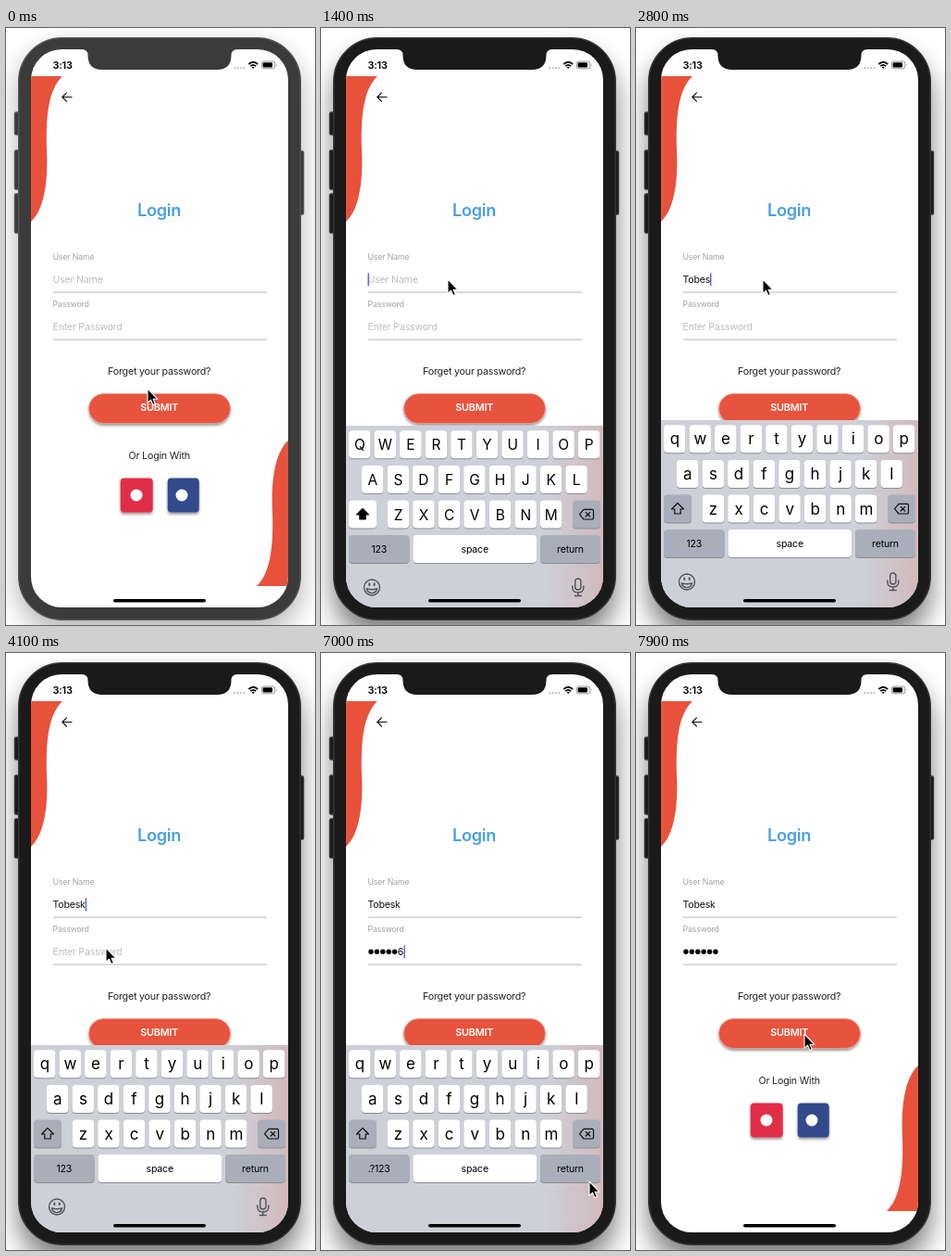
Write an HTML page that moves like this. It is 334 px wide and 644 px high and loops after 8000 ms.

```html
<!DOCTYPE html>
<html lang="en">
<head>
<meta charset="utf-8">
<title>Login screen</title>
<style>
  html, body { margin: 0; width: 100%; height: 100%; overflow: hidden; background: #fff; }
  svg { display: block; width: 334px; height: 644px; }
  text { font-family: Inter, Roboto, sans-serif; letter-spacing: -.02em; }
  .mid { text-anchor: middle; }
  .label { font-size: 8.8px; fill: #a3a3a3; }
  .hint { font-size: 10.6px; fill: #bdbdbd; }
  .value { font-size: 10.6px; fill: #111; }
  .note { font-size: 10.7px; fill: #222; }
  .line { fill: none; stroke: #111; stroke-width: 1.2; stroke-linecap: round; stroke-linejoin: round; }
</style>
</head>
<body>
<svg id="stage" viewBox="0 0 334 644">
  <defs>
    <filter id="blur" x="-30%" y="-20%" width="160%" height="140%"><feGaussianBlur stdDeviation="14"/></filter>
    <filter id="soft" x="-20%" y="-30%" width="140%" height="180%">
      <feDropShadow dx="0" dy="2" stdDeviation="1.7" flood-opacity=".42"/>
    </filter>
    <clipPath id="screen"><rect x="27" y="23" width="278" height="602" rx="33"/></clipPath>
    <linearGradient id="tint">
      <stop offset=".78" stop-color="#d99a98" stop-opacity="0"/>
      <stop offset="1" stop-color="#d99a98" stop-opacity=".42"/>
    </linearGradient>
    <path id="wave" d="M27 52H61C46 66 43 95 44 130C46 170 40 197 27 209Z" fill="#e8523c"/>
  </defs>

  <rect width="334" height="644" fill="#fff"/>
  <rect id="shadow" x="13" y="10" width="306" height="629" rx="48" filter="url(#blur)"/>
  <g id="body" stroke-width="1.5">
    <rect x="9.5" y="91" width="6" height="24" rx="1.5"/>
    <rect x="9.5" y="132" width="6" height="42" rx="1.5"/>
    <rect x="9.5" y="179" width="6" height="42" rx="1.5"/>
    <rect x="316" y="133" width="5.5" height="68" rx="1.5"/>
    <rect x="13.75" y="10.75" width="304.5" height="627.5" rx="47"/>
  </g>

  <g clip-path="url(#screen)">
    <rect x="27" y="23" width="278" height="602" fill="#fff"/>
    <use href="#wave"/>
    <use href="#wave" transform="rotate(180 166 327)"/>
    <path class="line" d="M71 74.5H61M65.5 69.8L60.8 74.5L65.5 79.2" stroke-width="1.6"/>

    <text class="mid" x="165.5" y="203" font-size="18.2" font-weight="600" fill="#4a9fe2">Login</text>
    <text class="label" x="50.5" y="250">User Name</text>
    <text class="label" x="50.5" y="301">Password</text>
    <path d="M51 285.2H282M51 336.2H282" stroke="#c6c6c6" stroke-width="1.2"/>
    <text id="userHint" class="hint" x="50.5" y="275.3">User Name</text>
    <text id="passHint" class="hint" x="50.5" y="326.3">Enter Password</text>
    <text id="user" class="value" x="50.5" y="275.3"></text>
    <g id="dots"></g>
    <text id="digit" class="value" y="326.3"></text>
    <rect id="caret" width="1.4" height="14" fill="#3f6fd8"/>

    <text class="note mid" x="165.7" y="374.2">Forget your password?</text>
    <rect x="89.5" y="394.5" width="153" height="32" rx="16" fill="#e8523c" stroke="#dfa79c" stroke-width=".7" filter="url(#soft)"/>
    <text class="mid" x="165.7" y="412.7" font-size="10.8" font-weight="600" fill="#fff">SUBMIT</text>
    <text class="note mid" x="165.7" y="464.5">Or Login With</text>
    <g filter="url(#soft)">
      <rect x="123.7" y="485.5" width="35" height="37" rx="4" fill="#e02d48"/>
      <rect x="174.7" y="485.5" width="34" height="37" rx="4" fill="#314a8c"/>
    </g>
    <circle cx="141" cy="504" r="6.5" fill="#fff"/>
    <circle cx="190" cy="504" r="6.5" fill="#fff"/>

    <g id="keyboard">
      <rect x="27" y="423" width="278" height="210" fill="#cdd0d7"/>
      <rect x="27" y="423" width="278" height="210" fill="url(#tint)"/>
      <g id="keys"></g>
      <path id="shift" d="M45 512.5L51.5 519H48.2V524H41.8V519H38.5Z" stroke="#111" stroke-width="1.2" stroke-linejoin="round"/>
      <path class="line" d="M279.5 518.7L284 513.4H293Q294.5 513.4 294.5 515V522.4Q294.5 524 293 524H284ZM286.2 516.4L290.8 521M290.8 516.4L286.2 521"/>
      <g id="extras" fill="none" stroke="#50555c" stroke-width="1.4" stroke-linecap="round">
        <circle cx="55" cy="597.5" r="8.5"/>
        <path d="M49.5 599Q55 600.5 60.5 599Q59.5 603.6 55 603.6Q50.5 603.6 49.5 599Z"/>
        <path d="M52.3 593.5V595M57.7 593.5V595" stroke-width="2"/>
        <rect x="274.7" y="588" width="6.2" height="12" rx="3.1"/>
        <path d="M271.8 596V598Q272 603 277.8 603Q283.6 603 283.8 598V596M277.8 603V606.5M274.3 606.5H281.3"/>
      </g>
    </g>
    <rect x="116" y="616" width="100" height="3.5" rx="1.75" fill="#000"/>

    <path id="notch" d="M82 22V23Q88.5 23 88.5 29.5Q88.5 45 104 45H228Q243.5 45 243.5 29.5Q243.5 23 250 23V22Z"/>
    <text x="50.5" y="43.8" font-size="11" font-weight="600">3:13</text>
    <path d="M247.2 43H260" stroke="#b5b5b5" stroke-width="2" stroke-linecap="round" stroke-dasharray="0 3.4"/>
    <g fill="none" stroke="#000" stroke-width="1.7">
      <path d="M262.3 39Q267.2 34.5 272.1 39M264.2 41.2Q267.2 38.5 270.2 41.2"/>
      <path d="M267.2 44L265.6 42.4Q267.2 41 268.8 42.4Z" fill="#000" stroke="none"/>
    </g>
    <rect x="276.3" y="36" width="14.5" height="7.8" rx="2.2" fill="none" stroke="#8d8d8d" stroke-width=".9"/>
    <rect x="277.6" y="37.3" width="10.4" height="5.2" rx="1.1"/>
    <path d="M292 38.6Q293.4 39.9 292 41.2Z" fill="#8d8d8d"/>
  </g>

  <path id="pointer" d="M0 0V15.4L3.5 12.2L5.9 17.6L8.4 16.5L6.1 11.3H11Z" fill="#000" stroke="#fff" stroke-width="1.1" stroke-linejoin="round"/>
</svg>

<script>
const LOOP = 8000;
const USER = "Tobesk";
const PIN = "123456";
const userTimes = [1900, 2120, 2340, 2560, 2760, 3000];
const pinTimes = [4600, 4900, 5200, 5480, 5800, 6150];
const focusAt = 1000, showAt = 1100, passwordAt = 4200, hideAt = 7220;

// Each move: start, end, x, y
const moves = [
  [150, 850, 137, 271],
  [3550, 4050, 108, 318],
  [6450, 6950, 290, 570],
  [7350, 7850, 182, 411]
];

const $ = id => document.getElementById(id);
const clamp = v => Math.min(1, Math.max(0, v));
const ease = v => v * v * (3 - 2 * v);

function add(parent, tag, attrs, text = "") {
  const node = document.createElementNS("http://www.w3.org/2000/svg", tag);
  for (const name in attrs) node.setAttribute(name, attrs[name]);
  node.textContent = text;
  return parent.appendChild(node);
}

function set(id, attrs) {
  for (const name in attrs) $(id).setAttribute(name, attrs[name]);
}

const show = (id, on) => set(id, { visibility: on ? "visible" : "hidden" });

function key(x, y, width, label, size, fill = "#fff") {
  add($("keys"), "rect", { x, y: y + 1, width, height: 30, rx: 4, fill: "#8b8e94" });
  const face = add($("keys"), "rect", { x, y, width, height: 30, rx: 4, fill });
  const text = add($("keys"), "text", { x: x + width / 2, y: y + 15 + size * .36, "font-size": size, class: "mid" }, label);
  return { face, text };
}

const GREY = "#a9aeba", PITCH = 27.55;
const letters = [];
["qwertyuiop", "asdfghjkl", "zxcvbnm"].forEach((row, r) => {
  const left = [30, 44, 71.7][r];
  [...row].forEach((letter, i) => {
    const { text } = key(left + i * PITCH, 428.3 + r * 37.6, 23.4, letter, 17);
    letters.push({ letter, text });
  });
});
const shiftKey = key(30, 503.5, 30, "", 10, GREY);
key(272, 503.5, 30, "", 10, GREY);
const modeKey = key(30, 541, 65.5, "123", 10.6, GREY);
key(99.5, 541, 133.5, "space", 10.6);
key(237, 541, 65, "return", 10.6, GREY);

const dots = [...PIN].map((_, i) =>
  add($("dots"), "circle", { cx: 54 + i * 6.4, cy: 322.3, r: 2.7 }));

function pointerAt(t) {
  let x = 153, y = 389;
  for (const [start, end, toX, toY] of moves) {
    const p = ease(clamp((t - start) / (end - start)));
    x += (toX - x) * p;
    y += (toY - y) * p;
  }
  return [x, y];
}

// Share of a critically damped slide that is still to go
function remaining(t) {
  const s = Math.max(0, t) / 56;
  return (1 + s) * Math.exp(-s);
}

function drawPhone(active) {
  set("shadow", { opacity: active ? .5 : .3, transform: `translate(0 ${active ? 18 : 12})` });
  set("body", { fill: active ? "#1a1a1a" : "#3b3b3b", stroke: active ? "#343434" : "#505050" });
  set("notch", { fill: active ? "#1a1a1a" : "#3b3b3b" });
}

function drawKeyboard(t, caps, secure) {
  const offset = t < hideAt ? remaining(t - showAt) : 1 - remaining(t - hideAt);
  set("keyboard", { transform: `translate(0 ${offset * 204})` });
  for (const { letter, text } of letters) {
    text.textContent = caps ? letter.toUpperCase() : letter;
    text.setAttribute("font-size", caps ? 15.5 : 17);
  }
  shiftKey.face.setAttribute("fill", caps ? "#fff" : GREY);
  set("shift", { fill: caps ? "#000" : "none" });
  modeKey.text.textContent = secure ? ".?123" : "123";
  show("extras", !secure);
}

function drawFields(t, typed, secure) {
  const entered = pinTimes.filter(at => t >= at).length;
  const editing = t < hideAt;
  const age = t - pinTimes[entered - 1];
  const plain = entered > 0 && editing && age < 2000;
  const hidden = entered - (plain ? 1 : 0);

  $("user").textContent = USER.slice(0, typed);
  show("userHint", typed === 0);
  show("passHint", entered === 0);
  dots.forEach((dot, i) => dot.setAttribute("visibility", i < hidden ? "visible" : "hidden"));
  $("digit").textContent = plain ? PIN[entered - 1] : "";
  set("digit", { x: 50.8 + hidden * 6.4 });

  const userEnd = 50.5 + (typed ? $("user").getComputedTextLength() : 0);
  const lastEdit = Math.max(showAt, ...[...userTimes, passwordAt, ...pinTimes].filter(at => t >= at));
  const lit = (t - lastEdit) % 1000 < 600 || t - lastEdit < 900;
  set("caret", { x: secure ? 50.5 + entered * 6.5 : userEnd, y: secure ? 315.3 : 264.3 });
  show("caret", t >= showAt && editing && lit);
}

function draw(t) {
  const typed = userTimes.filter(at => t >= at).length;
  const secure = t >= passwordAt;
  const [x, y] = pointerAt(t);
  drawPhone(t >= focusAt);
  drawKeyboard(t, typed === 0, secure);
  drawFields(t, typed, secure);
  set("pointer", { transform: `translate(${x} ${y})` });
}

const begin = performance.now();
function tick() {
  draw((performance.now() - begin) % LOOP);
  requestAnimationFrame(tick);
}
tick();
</script>
</body>
</html>
```
